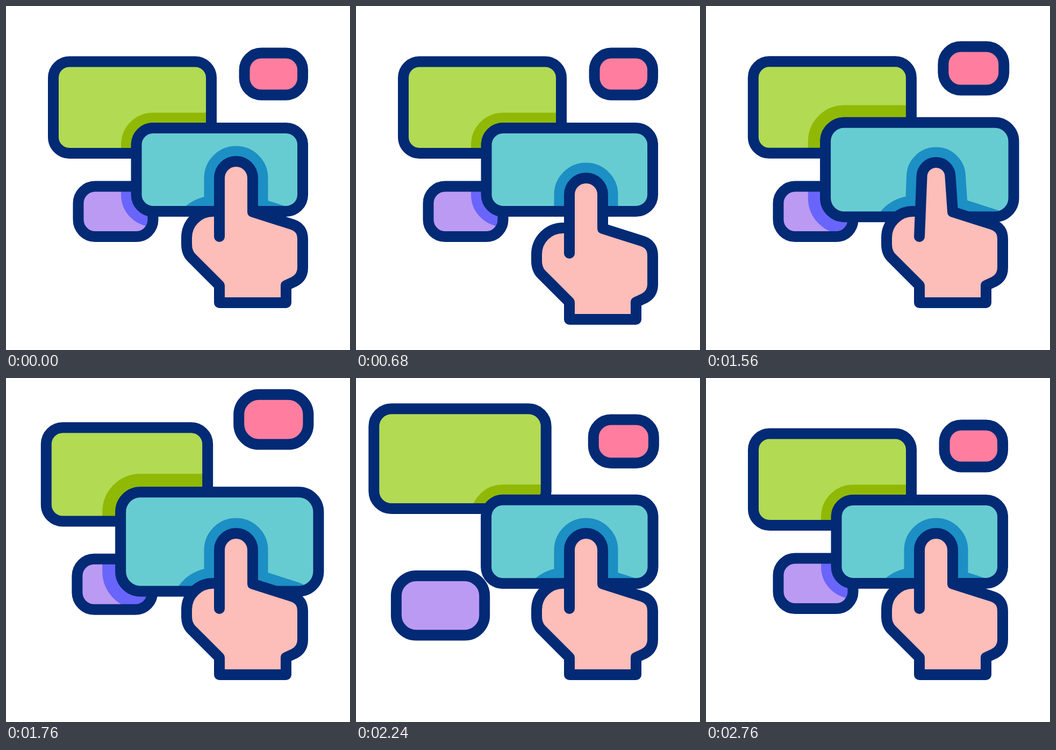
An HTML page that plays this animation: 640x640 px, repeating every 3 s.

```html
<!DOCTYPE html>
<html lang="en">
<head>
<meta charset="utf-8">
<title>Hand arranging cards</title>
<style>
  html, body { margin: 0; width: 100%; height: 100%; overflow: hidden; background: #fff; }
  svg { display: block; width: 100vw; height: 100vh; }
  .line { fill: none; stroke: #032a75; stroke-width: 20; stroke-linecap: round; stroke-linejoin: round; }
  .halo { stroke-linejoin: round; }
</style>
</head>
<body>
<svg viewBox="0 0 640 640">
  <defs>
    <clipPath id="greenClip"><rect class="green"/></clipPath>
    <clipPath id="purpleClip"><rect class="purple"/></clipPath>
    <clipPath id="blueClip"><rect class="blue"/></clipPath>
  </defs>

  <rect class="green" fill="#b2da53"/>
  <g clip-path="url(#greenClip)"><rect class="blue halo" fill="#90b905" stroke="#90b905"/></g>
  <rect class="green line"/>

  <rect class="purple" fill="#bb9af3"/>
  <g clip-path="url(#purpleClip)"><rect class="blue halo" fill="#6965fb" stroke="#6965fb"/></g>
  <rect class="purple line"/>

  <rect class="pink" fill="#ff7e9f"/>
  <rect class="pink line"/>

  <rect class="blue" fill="#67ccd1"/>
  <g clip-path="url(#blueClip)">
    <path class="hand" fill="#1c8fc4" stroke="#1c8fc4" stroke-width="57"/>
  </g>
  <rect class="blue line"/>

  <path class="hand" fill="#fdbdb8"/>
  <path class="hand line"/>
</svg>
<script>
const LOOP = 3000, SPAN = 560;
const all = sel => [...document.querySelectorAll(sel)];

// Rest box on the stroke's centre line, corner radius, peak time, peak shift and growth
const cards = [
  { name: 'blue', cx: 397.3, cy: 304.5, w: 309.5, h: 155, r: 31, peak: 1760, dx: 0, dy: 0, grow: 0.19 },
  { name: 'pink', cx: 497.8, cy: 126.5, w: 108.5, h: 78, r: 31.5, peak: 1893, dx: 0, dy: -55, grow: 0.213 },
  { name: 'green', cx: 235, cy: 188.7, w: 294, h: 170.5, r: 30, peak: 2087, dx: -49, dy: -45.5, grow: 0.106 },
  { name: 'purple', cx: 204, cy: 382.3, w: 139, h: 93.5, r: 31.5, peak: 2207, dx: -47.2, dy: 41.2, grow: 0.183 }
];
for (const c of cards) c.nodes = all('rect.' + c.name);
const halos = all('.halo'), hands = all('.hand');

const clamp = x => Math.min(1, Math.max(0, x));
const cubic = x => x < 0.5 ? 4 * x ** 3 : 1 - 4 * (1 - x) ** 3;

// Cubic bezier easing (0.7, 0, 0.48, 1)
function ease(x) {
  let lo = 0, hi = 1;
  for (let i = 0; i < 24; i++) {
    const s = (lo + hi) / 2, q = 1 - s;
    if (3 * q * q * s * 0.7 + 3 * q * s * s * 0.48 + s ** 3 < x) lo = s; else hi = s;
  }
  return lo * lo * (3 - 2 * lo);
}

function setCard(c, t) {
  const k = ease(clamp(1 - Math.abs(t - c.peak) / SPAN));
  const scale = 1 + c.grow * k, w = c.w * scale, h = c.h * scale;
  const box = {
    x: c.cx + c.dx * k - w / 2, y: c.cy + c.dy * k - h / 2,
    width: w, height: h, rx: c.r * scale
  };
  for (const n of c.nodes) for (const a in box) n.setAttribute(a, box[a].toFixed(2));
  return scale;
}

function handPath(pinch) {
  const half = 31 - pinch, tip = 289 + pinch * 0.45 + half;
  return `M397 429 L${428 - half} ${tip} A${half} ${half} 0 0 1 ${428 + half} ${tip}
    L459 383 L533 406.5 C546 411 552 420 552 434 V487 C552 500 546 508 536 513
    L521 520 V552 H397 V520 L345 468 C339 462 336 453 336 443 V431
    A49 49 0 0 1 385 382 H${397 + pinch * 0.45}`;
}

function draw(t) {
  for (const c of cards) {
    const scale = setCard(c, t);
    if (c.name === 'blue') for (const n of halos) n.setAttribute('stroke-width', 57 * scale);
  }
  const drop = 31 * (cubic(clamp(t / SPAN)) - cubic(clamp((t - 640) / SPAN)));
  const d = handPath(5 * cubic(clamp(1 - Math.abs(t - 1480) / 280)));
  for (const n of hands) {
    n.setAttribute('d', d);
    n.setAttribute('transform', `translate(0 ${drop.toFixed(3)})`);
  }
}

const start = performance.now();
function tick() {
  draw((performance.now() - start) % LOOP);
  requestAnimationFrame(tick);
}
tick();
</script>
</body>
</html>
```
